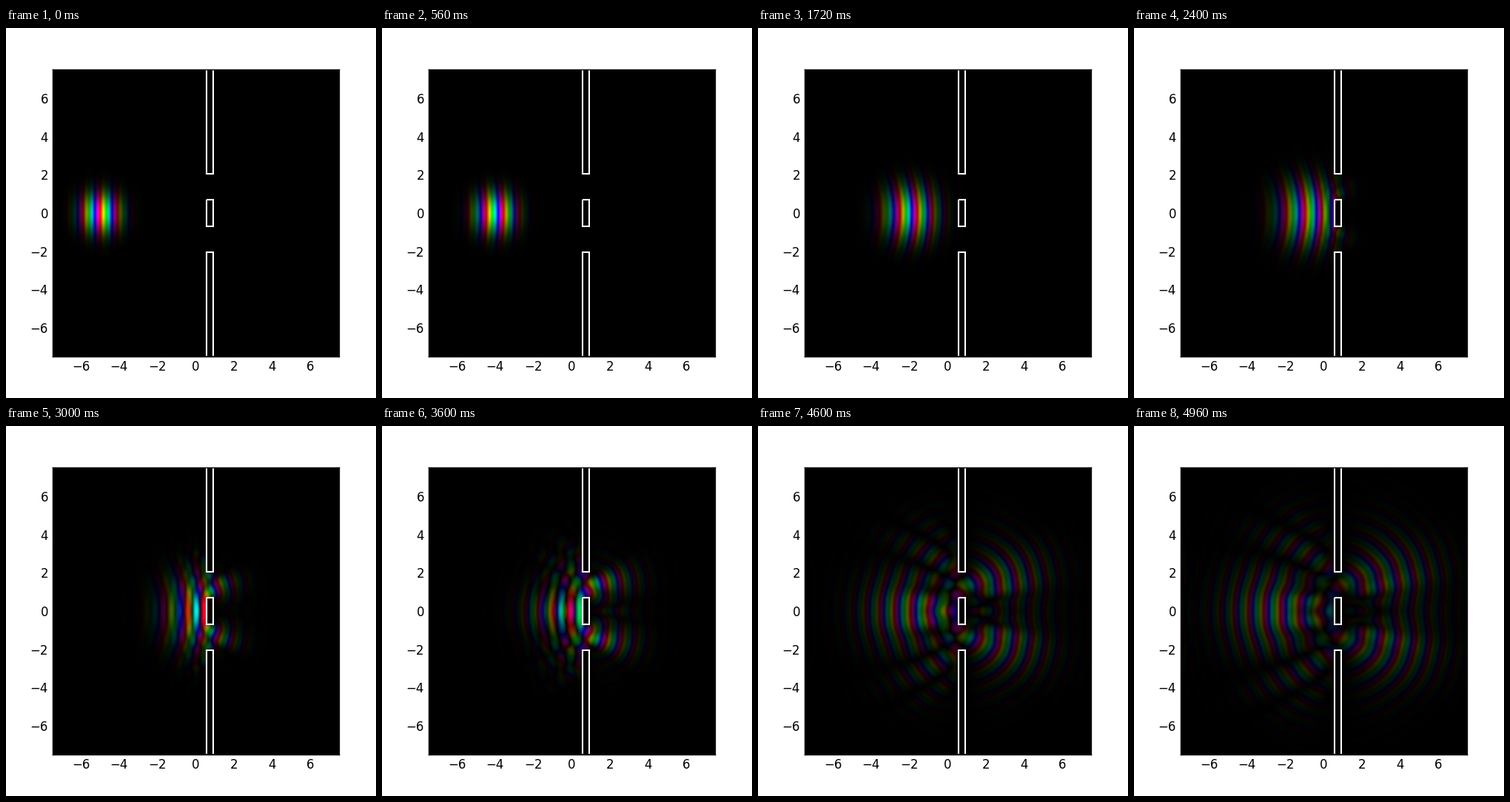
A matplotlib script that plays this animation: 500 by 500 pixels, repeating every 5000 ms.

```python
import numpy as np
import matplotlib.pyplot as plt
from matplotlib.animation import FuncAnimation
from matplotlib.colors import hsv_to_rgb

# Grid and time
SIZE, N = 15.0, 200
FRAMES, INTERVAL = 125, 40
DT, SUBSTEPS = 0.01, 5

# Wave packet
X0, K0, SIGMA = -5.0, 7.0, 0.5

# Barrier with two slits
WALL_X = (0.571, 0.919)
SLIT_IN, SLIT_OUT = 0.70, 2.05
WALL_V = 400.0

half = SIZE / 2
axis = -half + (np.arange(N) + 0.5) * SIZE / N
x, y = np.meshgrid(axis, axis)


def wall_potential():
    in_wall = (x > WALL_X[0]) & (x < WALL_X[1])
    closed = (np.abs(y) < SLIT_IN) | (np.abs(y) > SLIT_OUT)
    return np.where(in_wall & closed, WALL_V, 0.0)


def phase_colors(psi):
    """Hue shows the phase, brightness the amplitude."""
    hue = np.angle(psi) / (2 * np.pi) % 1
    value = np.clip(np.abs(psi), 0, 1)
    rgb = hsv_to_rgb(np.dstack([hue, np.ones_like(hue), value]))
    return np.round(rgb * 255).astype(np.uint8)


def simulate():
    """Split-step solution of the Schrodinger equation, one image per frame."""
    step = DT / SUBSTEPS
    k = 2 * np.pi * np.fft.fftfreq(N, SIZE / N)
    kx, ky = np.meshgrid(k, k)
    kinetic = np.exp(-0.5j * step * (kx**2 + ky**2))
    kick = np.exp(-0.5j * step * wall_potential())
    psi = np.exp(-((x - X0)**2 + y**2) / (4 * SIGMA**2) + 1j * K0 * (x - X0))
    images = []
    for _ in range(FRAMES):
        images.append(phase_colors(psi))
        for _ in range(SUBSTEPS):
            psi = kick * np.fft.ifft2(kinetic * np.fft.fft2(kick * psi))
    return images


def draw_barrier(ax):
    left, right = WALL_X
    end = half - SIZE / N / 2
    style = dict(color="white", lw=1.5, solid_joinstyle="miter",
                 solid_capstyle="butt")
    for sign in (1, -1):
        ax.plot([left, left, right, right],
                [sign * end, sign * SLIT_OUT, sign * SLIT_OUT, sign * end],
                **style)
    ax.plot([left, right, right, left, left],
            [SLIT_IN, SLIT_IN, -SLIT_IN, -SLIT_IN, SLIT_IN], **style)


images = simulate()

plt.rcParams.update({"font.family": "DejaVu Sans", "font.size": 12,
                     "axes.linewidth": 1.0})
fig = plt.figure(figsize=(5, 5), dpi=100, facecolor="white")
ax = fig.add_axes([0.125, 0.1, 0.775, 0.8])
picture = ax.imshow(images[0], extent=[-half, half, -half, half],
                    origin="lower", interpolation="bilinear")
draw_barrier(ax)
ax.set(xlim=(-half, half), ylim=(-half, half),
       xticks=range(-6, 7, 2), yticks=range(-6, 7, 2))
ax.tick_params(length=0, pad=4, labelsize=12)


def update(frame):
    picture.set_data(images[frame])
    return [picture]


anim = FuncAnimation(fig, update, frames=FRAMES, interval=INTERVAL,
                     repeat=True, repeat_delay=0)
plt.show()
```
